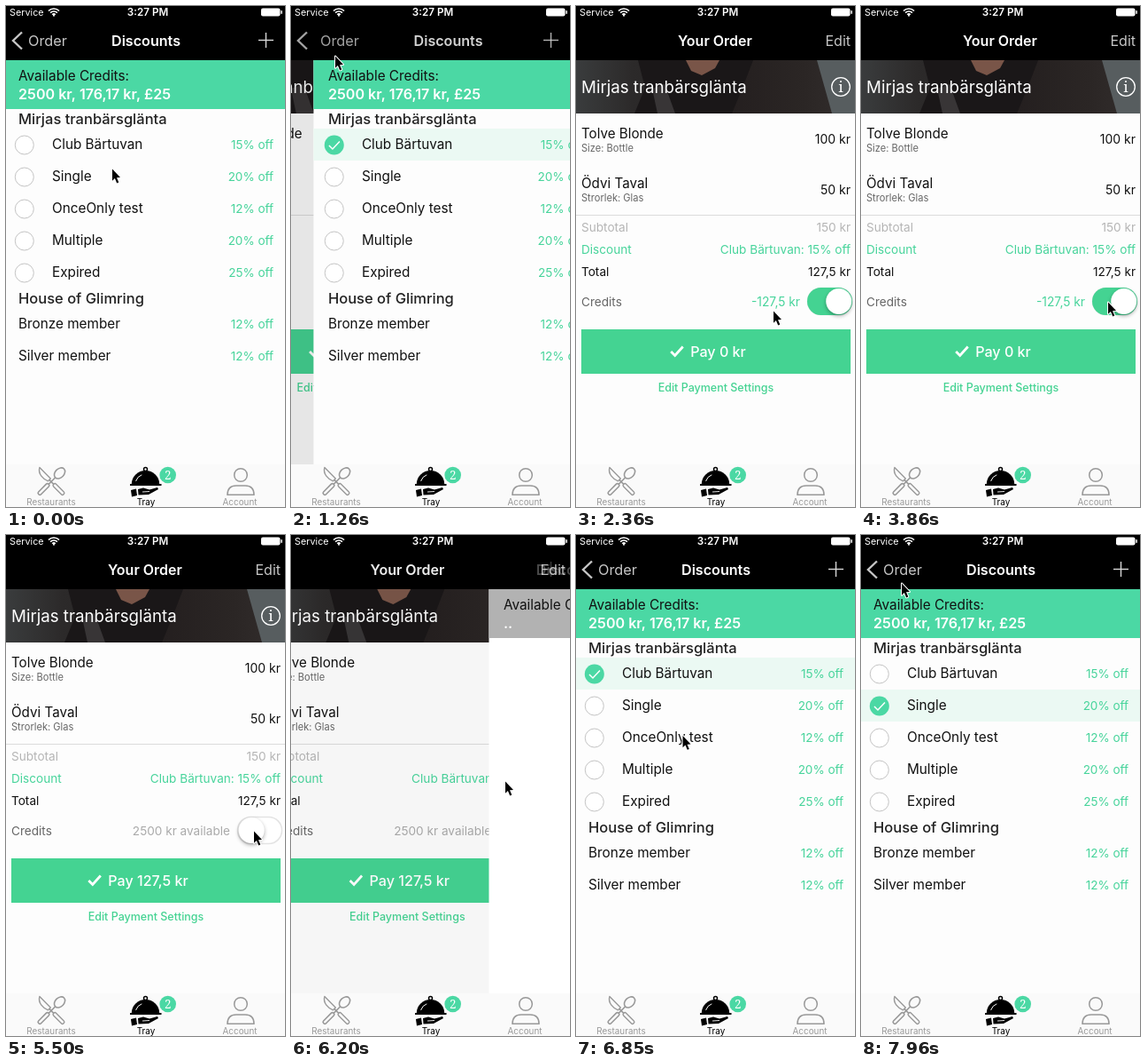
These frames come from a looping animation (315 px wide and 564 px high, 8000 ms). An HTML page with a canvas:

```html
<!DOCTYPE html>
<html lang="en">
<head>
<meta charset="utf-8">
<title>Discounts and credits</title>
<style>
html, body { margin: 0; width: 100%; height: 100%; overflow: hidden; background: #fdfdfd; }
canvas { display: block; width: 315px; height: 564px; }
</style>
</head>
<body>
<canvas id="stage"></canvas>
<script>
const W = 315, H = 564, LOOP = 8000, BLEED = 2.5;
const GREEN = '#47d49b', BAR = '#4bd8a4', BUTTON = '#44d392', PAGE = '#fdfdfd', SOFT = '#c6c6c6', ICON = '#999';
const FONT = 'Inter, "Open Sans", sans-serif';
const VENUE = 'Mirjas tranbärsglänta';

const canvas = document.getElementById('stage');
const ctx = canvas.getContext('2d');
const dpr = window.devicePixelRatio || 1;
canvas.width = W * dpr;
canvas.height = H * dpr;

const clamp = v => Math.max(0, Math.min(1, v));
const mix = (a, b, k) => a + (b - a) * k;
const smooth = k => k * k * (3 - 2 * k);
const easeOut = k => 1 - (1 - k) ** 3;

// Critically damped spring used by both page transitions
function spring(ms) {
  if (ms <= 0) return 0;
  if (ms > 600) return 1;
  const k = ms * 0.015;
  return 1 - (1 + k) * Math.exp(-k);
}

// Timeline
const POP = 1228, PUSH = 6131, LOADED = 6700;
const pointer = [
  [0, 119, 183], [50, 119, 183], [390, 100, 158], [690, 100, 158], [1080, 49, 56],
  [1500, 49, 56], [2330, 222, 343], [2380, 222, 343], [2760, 277.5, 333], [5500, 279, 333],
  [6020, 241, 277], [6400, 241, 277], [7080, 76, 207], [7130, 75, 206], [7550, 75, 206], [7960, 45, 54]
];

function pointerAt(t) {
  const i = pointer.findIndex(k => k[0] > t);
  if (i < 0) return pointer[pointer.length - 1].slice(1);
  const [t0, x0, y0] = pointer[i - 1], [t1, x1, y1] = pointer[i];
  const k = smooth((t - t0) / (t1 - t0));
  return [mix(x0, x1, k), mix(y0, y1, k)];
}

function switchAt(t) {
  if (t < 3630) return 1 - easeOut(clamp((t - 2900) / 420));
  if (t < 4180) return easeOut(clamp((t - 3630) / 220));
  return 1 - easeOut(clamp((t - 4180) / 420));
}

// Drawing helpers
function text(str, x, y, size, color, { align = 'left', weight = 400, family = FONT } = {}) {
  ctx.font = `${weight} ${size}px ${family}`;
  ctx.textAlign = align;
  ctx.fillStyle = color;
  ctx.fillText(str, x, y);
}

function rect(x, y, w, h, color) {
  ctx.fillStyle = color;
  ctx.fillRect(x, y, w, h);
}

function path(points, close) {
  ctx.beginPath();
  points.forEach(([x, y]) => ctx.lineTo(x, y));
  if (close) ctx.closePath();
}

function shape(points, color) {
  path(points, true);
  ctx.fillStyle = color;
  ctx.fill();
}

function line(points, color, width) {
  path(points);
  ctx.strokeStyle = color;
  ctx.lineWidth = width;
  ctx.stroke();
}

function circle(x, y, r, fill, stroke, width = 1) {
  ctx.beginPath();
  ctx.arc(x, y, r, 0, 7);
  if (fill) { ctx.fillStyle = fill; ctx.fill(); }
  if (stroke) { ctx.strokeStyle = stroke; ctx.lineWidth = width; ctx.stroke(); }
}

function pill(x, y, w, h, r) {
  ctx.beginPath();
  ctx.roundRect(x, y, w, h, r);
}

function faded(alpha, draw) {
  if (alpha <= 0) return;
  ctx.save();
  ctx.globalAlpha = Math.min(1, alpha);
  draw();
  ctx.restore();
}

function shifted(x, draw) {
  ctx.save();
  ctx.translate(x, 0);
  draw();
  ctx.restore();
}

// Pages
function photo() {
  ctx.save();
  ctx.beginPath();
  ctx.rect(0, 61, W, 60);
  ctx.clip();
  const back = ctx.createLinearGradient(0, 0, W, 0);
  back.addColorStop(0, '#3a3c3d');
  back.addColorStop(0.2, '#2c2a2a');
  back.addColorStop(0.55, '#241f1f');
  back.addColorStop(0.82, '#2b2625');
  back.addColorStop(1, '#332e2d');
  rect(0, 61, W, 60, back);
  shape([[70, 61], [200, 61], [188, 92], [176, 121], [66, 121], [78, 92]], '#1a1718');
  shape([[124, 61], [162, 61], [157, 70], [142, 78], [130, 73]], '#795548');
  shape([[86, 93], [100, 88], [112, 121], [92, 121]], '#383536');
  shape([[272, 61], [W, 61], [W, 121], [289, 121]], '#575d5f');
  ctx.restore();
}

function toggle(on) {
  const x = 261.5, y = 317.5, w = 50, h = 30;
  pill(x, y, w, h, 15);
  ctx.fillStyle = '#fff';
  ctx.fill();
  ctx.strokeStyle = '#e3e3e3';
  ctx.lineWidth = 1.5;
  ctx.stroke();
  faded(on, () => {
    pill(x - 0.5, y - 0.5, w + 1, h + 1, 15.5);
    ctx.fillStyle = BUTTON;
    ctx.fill();
  });
  ctx.save();
  ctx.shadowColor = 'rgba(0,0,0,0.32)';
  ctx.shadowBlur = 4 * dpr;
  ctx.shadowOffsetY = 2 * dpr;
  circle(mix(277.2, 296.7, on), 332.5, 14.5, '#fff');
  ctx.restore();
}

function orderPage(t) {
  const right = { align: 'right' };
  const useCredits = t < 3000 || (t >= 3700 && t < 4280);
  rect(0, 61, W, H - 61, PAGE);
  photo();
  text(VENUE, 6, 97.5, 18.7, '#fff');
  circle(299, 91, 10.3, null, '#fff', 1.3);
  text('i', 299, 97, 17, '#fff', { align: 'center', family: '"Noto Serif", serif' });

  text('Tolve Blonde', 6, 148.5, 15.2, '#111');
  text('Size: Bottle', 6, 164, 11.1, '#666');
  text('100 kr', 310, 155, 14, '#111', right);
  text('Ödvi Taval', 6, 205, 15.2, '#111');
  text('Strorlek: Glas', 6, 220, 11.1, '#666');
  text('50 kr', 310, 211.5, 14, '#111', right);
  rect(0, 235, W, 1, '#dcdcdc');

  text('Subtotal', 6, 253.5, 13.6, '#b5b5b5');
  text('150 kr', 310, 253.5, 13.6, '#b5b5b5', right);
  text('Discount', 6, 278.5, 13.6, GREEN);
  text('Club Bärtuvan: 15% off', 310, 278.5, 13.6, GREEN, right);
  text('Total', 6, 303.5, 13.6, '#111');
  text('127,5 kr', 310, 303.5, 13.6, '#111', right);
  text('Credits', 6, 337.5, 13.6, '#666');
  if (useCredits) text('-127,5 kr', 253, 337.5, 13.8, GREEN, right);
  else text('2500 kr available', 253, 337.5, 13.6, '#aaa', right);
  toggle(switchAt(t));

  rect(6, 364, 304, 50, BUTTON);
  const label = useCredits ? 'Pay 0 kr' : 'Pay 127,5 kr';
  text(label, 160.5, 395, 16.1, '#fff', { align: 'center', weight: 500 });
  const left = 160.5 - ctx.measureText(label).width / 2 - 23;
  line([[left + 1, 389], [left + 5.5, 393.5], [left + 14.5, 383.5]], '#fff', 2.8);
  text('Edit Payment Settings', 158, 433.5, 12.5, BUTTON, { align: 'center', weight: 500 });
}

function discountRow(name, off, i, selected) {
  const y = 156.5 + i * 36;
  if (selected) {
    rect(-BLEED, y - 18.5, W + BLEED, 36, '#ebf9f3');
    circle(20.8, y, 11, BAR);
    line([[15, y + 0.5], [19, y + 4.5], [27, y - 4]], '#fff', 1.5);
  } else {
    circle(20.8, y, 10.5, '#fff', '#c4c4c4');
  }
  text(name, 52, y + 4.7, 15.3, '#111');
  percent(off, y + 4.7);
}

function percent(off, y) {
  text(off + '% off', 302, y, 13.5, GREEN, { align: 'right' });
}

function discountsPage(t) {
  const loaded = t < PUSH || t >= LOADED;
  const selected = t < 330 ? -1 : t < 7370 ? 0 : 1;
  rect(-BLEED, 61, W + BLEED, H - 61, loaded ? PAGE : '#fff');
  rect(-BLEED, 61, W + BLEED, 55, loaded ? BAR : '#b2b2b2');
  text('Available Credits:', 14, 84, 15.3, '#111');
  text(loaded ? '2500 kr, 176,17 kr, £25' : '..', 14, 104.7, 16.1, '#fff', { weight: 600 });
  if (!loaded) return;

  const header = { weight: 500 };
  text(VENUE, 14, 133, 16.5, '#222', header);
  [['Club Bärtuvan', 15], ['Single', 20], ['OnceOnly test', 12], ['Multiple', 20], ['Expired', 25]]
    .forEach(([name, off], i) => discountRow(name, off, i, i === selected));
  text('House of Glimring', 14, 335, 16.5, '#222', header);
  ['Bronze member', 'Silver member'].forEach((name, i) => {
    text(name, 14, 363.2 + i * 36, 15.3, '#111');
    percent(12, 363.2 + i * 36);
  });
}

// Bars
function statusBar() {
  text('Service', 4, 11.3, 10.8, '#fff');
  text('3:27 PM', 160, 11.3, 11.7, '#fff', { align: 'center', weight: 600 });
  [2.5, 5.5, 8.5].forEach(r => {
    ctx.beginPath();
    ctx.arc(54, 11.5, r, -Math.PI * 0.75, -Math.PI * 0.25);
    ctx.strokeStyle = '#fff';
    ctx.lineWidth = 1.7;
    ctx.stroke();
  });
  circle(54, 10.8, 1, '#fff');
  pill(288, 2.5, 21.5, 9, 2);
  ctx.fillStyle = '#fff';
  ctx.fill();
  rect(310.3, 5.2, 1.5, 3.6, '#fff');
}

function navBar(t, p) {
  rect(0, 0, W, 61, '#000');
  statusBar();
  const pushing = t >= PUSH;
  const moving = pushing || t >= POP;
  const orderAlpha = pushing ? 1.3 * (1 - p) : clamp((t - 1470) / 220);
  const mainAlpha = pushing ? p : moving ? 1 - 2 * (1 - p) : 1;
  const backAlpha = pushing ? clamp((t - 6350) / 220) : mainAlpha;

  faded(orderAlpha, () => {
    text('Your Order', 115 - 90 * p, 45, 16, '#fff', { weight: 600 });
    text('Edit', 310, 45, 16, SOFT, { align: 'right' });
  });
  faded(backAlpha, () => {
    line([[18, 29.5], [8, 39], [18, 48.5]], SOFT, 2.4);
    text('Order', 25 + 90 * (1 - p), 45, 16.3, SOFT);
  });
  faded(mainAlpha, () => {
    text('Discounts', 158 + 220 * (1 - p), 45, 16.1, '#fff', { weight: 600, align: 'center' });
    line([[285, 38.5], [302, 38.5]], '#d8d8d8', 1.4);
    line([[293.5, 30], [293.5, 47]], '#d8d8d8', 1.4);
  });
}

function cutleryIcon() {
  ctx.save();
  ctx.translate(51, 535.5);
  ctx.strokeStyle = ICON;
  ctx.fillStyle = '#fafafa';
  ctx.lineWidth = 1.4;
  ctx.lineJoin = 'round';
  // Knife
  ctx.save();
  ctx.rotate(-Math.PI / 4);
  ctx.beginPath();
  ctx.moveTo(2, -20.5);
  ctx.bezierCurveTo(-4.5, -17, -4.5, -8, -2, -3);
  ctx.lineTo(2, -3);
  ctx.closePath();
  ctx.stroke();
  pill(-2, 4, 4, 16, 1.8);
  ctx.stroke();
  line([[0, -3], [0, 4]], ICON, 1.6);
  ctx.restore();
  // Spoon
  ctx.rotate(Math.PI / 4);
  line([[0, -7], [0, 4]], ICON, 1.6);
  ctx.beginPath();
  ctx.ellipse(0, -13.5, 5, 7, 0, 0, 7);
  ctx.fill();
  ctx.stroke();
  pill(-2, 4, 4, 16, 1.8);
  ctx.fill();
  ctx.stroke();
  ctx.restore();
}

function trayIcon() {
  circle(157.5, 521.5, 2, null, '#000', 1.5);
  ctx.beginPath();
  ctx.ellipse(157.5, 538, 15.7, 15, 0, Math.PI, 0);
  ctx.fillStyle = '#000';
  ctx.fill();
  ctx.beginPath();
  ctx.arc(157.5, 538.5, 11.5, Math.PI * 1.1, Math.PI * 1.38);
  ctx.strokeStyle = '#fafafa';
  ctx.lineWidth = 1;
  ctx.stroke();
  rect(140, 538, 35.5, 2, '#000');
  shape([[141, 545], [147, 543.5], [148, 551], [142, 552.5]], '#000');
  shape([[149, 544], [155, 542.5], [162, 544.5], [171, 542], [172, 544], [161, 550], [149.5, 550.5]], '#000');
  line([[154, 547], [162, 546.5]], '#fafafa', 0.9);
  circle(182.7, 528, 9.3, BAR);
  text('2', 182.7, 532.8, 13.5, '#fff', { align: 'center', family: '"Noto Serif", serif' });
}

function accountIcon() {
  circle(265, 528, 7.3, null, ICON, 1.5);
  ctx.beginPath();
  ctx.moveTo(250, 550.3);
  ctx.bezierCurveTo(250, 543.5, 254, 540, 260, 540);
  ctx.lineTo(270, 540);
  ctx.bezierCurveTo(276, 540, 280, 543.5, 280, 550.3);
  ctx.closePath();
  ctx.stroke();
}

function tabBar() {
  rect(0, 516, W, H - 516, '#fafafa');
  cutleryIcon();
  trayIcon();
  accountIcon();
  [['Restaurants', 51, ICON], ['Tray', 158, '#000'], ['Account', 264, ICON]]
    .forEach(([name, x, color]) => text(name, x, 561.5, 9.9, color, { align: 'center' }));
}

function cursor(x, y) {
  ctx.save();
  ctx.translate(x, y);
  ctx.lineJoin = 'round';
  path([[1, 0.5], [1, 13.7], [3.9, 11], [6.2, 16.4], [8.3, 15.5], [6, 10.2], [10, 10]], true);
  ctx.strokeStyle = '#fff';
  ctx.lineWidth = 2;
  ctx.stroke();
  ctx.fillStyle = '#000';
  ctx.fill();
  ctx.restore();
}

function draw(t) {
  const p = t < PUSH ? 1 - spring(t - POP) : spring(t - PUSH);
  ctx.setTransform(dpr, 0, 0, dpr, 0, 0);
  rect(0, 0, W, H, PAGE);
  if (p < 1) {
    shifted(-0.3 * W * p, () => orderPage(t));
    rect(0, 61, W, H - 61, `rgba(0,0,0,${0.1 * p})`);
  }
  if (p > 0) shifted(W * (1 - p), () => discountsPage(t));
  navBar(t, p);
  tabBar();
  cursor(...pointerAt(t));
}

const start = performance.now();
function frame() {
  draw((performance.now() - start) % LOOP);
  requestAnimationFrame(frame);
}
frame();
</script>
</body>
</html>
```
